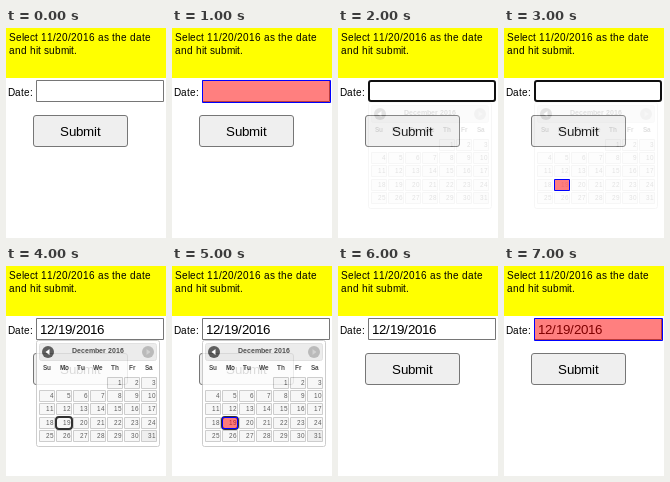
Animation of 160x210 px, one loop 8 s. Source, as an HTML page with a canvas:

```html
<!DOCTYPE html>
<html lang="en">
<head>
<meta charset="utf-8">
<title>Date picker</title>
<style>
  html, body { margin: 0; width: 100%; height: 100%; overflow: hidden; background: #fff; }
  canvas { display: block; }
</style>
</head>
<body>
<canvas id="stage" width="160" height="210"></canvas>
<script>
const W = 160, H = 210, STEP = 1000, STEPS = 8;
const stage = document.getElementById('stage').getContext('2d');

// Text set on whole pixels; align is 0 (left), 0.5 (centre) or 1 (right).
function text(c, str, x, y, size, color = '#000', align = 0, weight = '') {
  c.font = `${weight} ${size}px "Liberation Sans", Arial, sans-serif`;
  c.fillStyle = color;
  const advances = [...str].map(ch => Math.round(c.measureText(ch).width));
  x = Math.round(x - align * advances.reduce((a, b) => a + b, 0));
  [...str].forEach((ch, i) => {
    c.fillText(ch, x, y);
    x += advances[i];
  });
}

// Filled box whose border lies inside its edges.
function box(c, x, y, w, h, fill, border, radius = 0, line = 1) {
  c.beginPath();
  c.roundRect(x + line / 2, y + line / 2, w - line, h - line, radius);
  c.fillStyle = fill;
  c.fill();
  c.strokeStyle = border;
  c.lineWidth = line;
  c.stroke();
}

function arrow(c, x, y, dir, alpha) {
  c.globalAlpha = alpha;
  c.fillStyle = '#444';
  c.beginPath();
  c.arc(x, y, 6, 0, 2 * Math.PI);
  c.fill();
  c.fillStyle = '#fff';
  c.beginPath();
  c.moveTo(x + 2.5 * dir, y);
  c.lineTo(x - 1.5 * dir, y - 3);
  c.lineTo(x - 1.5 * dir, y + 3);
  c.fill();
  c.globalAlpha = 1;
}

function makePicker(focused) {
  const canvas = document.createElement('canvas');
  canvas.width = W;
  canvas.height = H;
  const c = canvas.getContext('2d');
  box(c, 30, 74, 124, 107, '#fff', '#c5c5c5', 2);
  box(c, 33, 77, 118, 18, '#e9e9e9', '#ddd', 2);
  arrow(c, 42, 86, -1, 1);
  arrow(c, 142, 86, 1, 0.35);
  text(c, 'December 2016', 92, 87, 7, '#333', 0.5, 'bold');

  const column = i => 33 + 17 * i;
  ['Su', 'Mo', 'Tu', 'We', 'Th', 'Fr', 'Sa'].forEach((day, i) =>
    text(c, day, column(i) + 8, 104, 6.4, '#333', 0.5, 'bold'));
  for (let day = 1; day <= 31; day++) {
    const slot = day + 3;
    const x = column(slot % 7), y = Math.floor(111 + 13.4 * Math.floor(slot / 7));
    box(c, x, y, 16, 12, day === 31 ? '#ededed' : '#f6f6f6', '#c5c5c5');
    text(c, String(day), x + 15, y + 8, 6.4, '#454545', 1);
  }
  if (focused) box(c, 49, 150, 18, 14, 'transparent', '#101010', 3, 2);
  return canvas;
}

const picker = makePicker(false), focusedPicker = makePicker(true);

function showPicker(image, alpha) {
  stage.globalAlpha = alpha;
  stage.drawImage(image, 0, 0);
  stage.globalAlpha = 1;
}

const highlight = (x, y, w, h) => box(stage, x, y, w, h, 'rgba(255,0,0,.5)', '#00f');

function draw(now) {
  const step = Math.floor(now / STEP) % STEPS;
  const opening = step === 2 || step === 3;
  const picked = step === 4 || step === 5;

  stage.fillStyle = '#fff';
  stage.fillRect(0, 0, W, H);
  stage.fillStyle = '#ff0';
  stage.fillRect(0, 0, W, 50);
  text(stage, 'Select 11/20/2016 as the date', 3, 13, 10);
  text(stage, 'and hit submit.', 3, 26, 10);
  text(stage, 'Date:', 2, 68, 10);

  if (opening) box(stage, 30, 52, 128, 22, '#fff', '#101010', 2, 2);
  else box(stage, 30, 52, 128, 22, '#fff', '#767676');
  if (step >= 4) text(stage, '12/19/2016', 34, 68, 13.333);

  box(stage, 27, 87, 95, 32, '#efefef', '#767676', 2.5);
  text(stage, 'Submit', 54, 108, 13.333);

  if (opening) showPicker(picker, 0.15);
  if (picked) showPicker(focusedPicker, 0.86);
  if (step === 1 || step === 7) highlight(30, 52, 129, 23);
  if (step === 3 || step === 5) highlight(50, 151, 16, 12);
}

let start;
function tick(now) {
  start ??= now;
  draw(now - start);
  requestAnimationFrame(tick);
}
draw(0);
requestAnimationFrame(tick);
</script>
</body>
</html>
```
